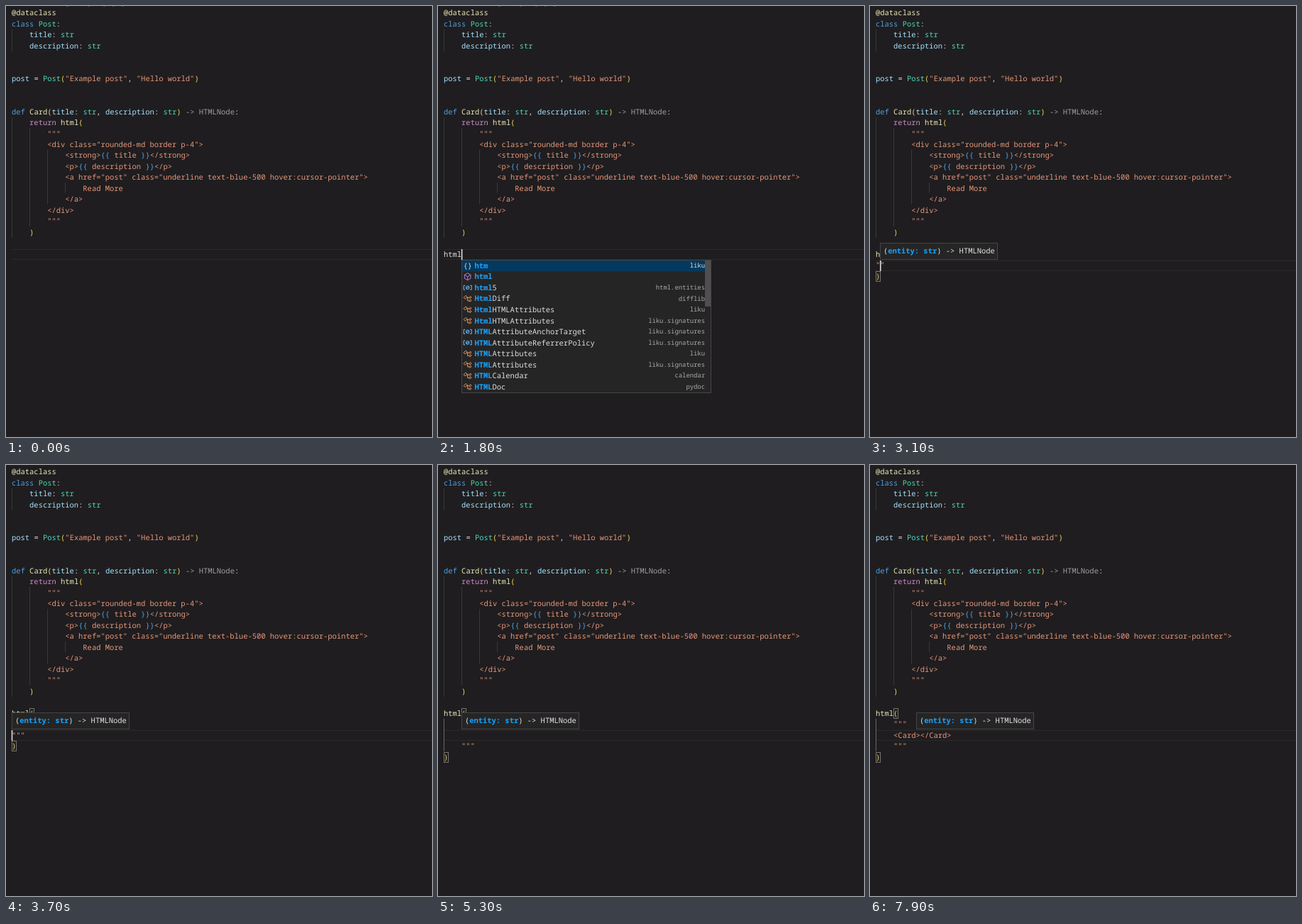
Write an HTML page with a canvas that moves like this. It is 600 by 608 pixels and loops after 8000 ms.

```html
<!DOCTYPE html>
<html lang="en">
<head>
<meta charset="utf-8">
<title>Editor typing</title>
<style>
  html, body { margin: 0; width: 100%; height: 100%; overflow: hidden; background: #1f1d1f; }
  canvas { display: block; width: 600px; height: 608px; }
</style>
</head>
<body>
<canvas id="stage" width="600" height="608"></canvas>
<script>
const ctx = document.getElementById('stage').getContext('2d');
const LOOP = 8000, LEFT = 8, CHAR = 6.28, TOP = 1.75, LINE = 15.48;
const BLINK = 600, FIRST = 22;
const FAMILY = '"Noto Sans Mono", "DejaVu Sans Mono", monospace';
const SIZE = CHAR / 0.6;

const COLORS = {
  w: '#e2e2e2', f: '#e8e8b6', k: '#4f9fe2', t: '#4fd6bb', v: '#a4e2ff',
  s: '#e6977a', g: '#f6da58', r: '#cc8cc6', h: '#9e9e9e', b: '#18a3ff', e: '#cb5f4c'
};

// Segments are split by "|"; the first letter of each picks its color.
const CODE = [
  'f@dataclass',
  'kclass |tPost|w:',
  'v    title|w: |tstr',
  'v    description|w: |tstr',
  '', '',
  'vpost |w= |tPost|g(|s"Example post"|w, |s"Hello world"|g)',
  '', '',
  'kdef |fCard|g(|vtitle|w: |tstr|w, |vdescription|w: |tstr|g)|h -> HTMLNode|w:',
  'r    return |fhtml|g(',
  's        """',
  's        <div class="rounded-md border p-4">',
  's            <strong>|k{{|s title |k}}|s</strong>',
  's            <p>|k{{|s description |k}}|s</p>',
  's            <a href="post" class="underline text-blue-500 hover:cursor-pointer">',
  's                Read More',
  's            </a>',
  's        </div>',
  's        """',
  'g    )'
];

// [column, first line, last line]
const GUIDES = [[0, 2, 3], [0, 10, 20], [4, 11, 19], [8, 13, 17], [12, 16, 16]];

const OPEN = 'fhtml|g(', CLOSE = 'g)', QUOTES = 's"""', INDENTED = 's    """';
const block = (...body) => [OPEN, ...body, CLOSE];
const tag = text => block(INDENTED, 's    ' + text, INDENTED);

// [time, typed lines, cursor line, cursor column]
const EDITS = [
  [-600, [''], 0, 0],
  [1000, ['wh'], 0, 1],
  [1100, ['wht'], 0, 2],
  [1200, ['whtm'], 0, 3],
  [1800, ['whtml'], 0, 4],
  [1900, ['fhtml|g()'], 0, 5],
  [2800, block(''), 1, 0],
  [3000, block('s""'), 1, 1],
  [3200, block('s""'), 1, 2],
  [3400, block('s""""""'), 1, 3],
  [3700, block(QUOTES, QUOTES), 2, 0],
  [4000, block(QUOTES, INDENTED), 2, 4],
  [4200, block(QUOTES, INDENTED), 1, 0],
  [4300, block(INDENTED, INDENTED), 1, 4],
  [4500, block(INDENTED, INDENTED), 1, 7],
  [4600, tag(''), 2, 4],
  [6000, tag('<'), 2, 5],
  [6200, tag('<C'), 2, 6],
  [6300, tag('<Ca'), 2, 7],
  [6400, tag('<Car'), 2, 8],
  [6500, tag('<Card'), 2, 9],
  [6800, tag('<Card></Card>'), 2, 9]
];

// [icon, label, module]
const SUGGESTIONS = [
  ['snippet', 'htm', 'liku'], ['cube', 'html', ''],
  ['variable', 'html5', 'html.entities'], ['class', 'HtmlDiff', 'difflib'],
  ['class', 'HtmlHTMLAttributes', 'liku'], ['class', 'HtmlHTMLAttributes', 'liku.signatures'],
  ['variable', 'HTMLAttributeAnchorTarget', 'liku.signatures'],
  ['variable', 'HTMLAttributeReferrerPolicy', 'liku.signatures'],
  ['class', 'HTMLAttributes', 'liku'], ['class', 'HTMLAttributes', 'liku.signatures'],
  ['class', 'HTMLCalendar', 'calendar'], ['class', 'HTMLDoc', 'pydoc']
];

const colX = col => LEFT + col * CHAR;
const lineY = line => TOP + line * LINE;

function fill(x, y, w, h, color) {
  ctx.fillStyle = color;
  ctx.fillRect(x, y, w, h);
}

function frame(x, y, w, h, color) {
  ctx.strokeStyle = color;
  ctx.lineWidth = 1;
  ctx.strokeRect(Math.round(x) + 0.5, Math.round(y) + 0.5, Math.round(w), Math.round(h));
}

function path(color, width, points, closed) {
  ctx.strokeStyle = color;
  ctx.lineWidth = width;
  ctx.beginPath();
  points.forEach(([x, y]) => ctx.lineTo(x, y));
  if (closed) ctx.closePath();
  ctx.stroke();
}

function disc(x, y, r, color) {
  ctx.fillStyle = color;
  ctx.beginPath();
  ctx.arc(x, y, r, 0, 7);
  ctx.fill();
}

function arc(x, y, r, end, width, color) {
  ctx.strokeStyle = color;
  ctx.lineWidth = width;
  ctx.beginPath();
  ctx.arc(x, y, r, 0, end);
  ctx.stroke();
}

function write(text, x, y, color, { size = SIZE, weight = 500, align = 'left' } = {}) {
  ctx.font = `${weight} ${size}px ${FAMILY}`;
  ctx.textAlign = align;
  ctx.fillStyle = color;
  ctx.fillText(text, x, y);
}

function writeCode(markup, line) {
  let col = 0;
  if (!markup) return;
  for (const part of markup.split('|')) {
    const text = part.slice(1);
    write(text, colX(col), lineY(line) + 11.5, COLORS[part[0]]);
    col += text.length;
  }
}

function guide(col, from, to, color) {
  fill(Math.round(colX(col)), Math.round(lineY(from)), 1, Math.round((to - from + 1) * LINE), color);
}

function bracketBox(line, col) {
  frame(colX(col), lineY(line) + 0.5, CHAR, LINE - 1.5, '#747474');
}

function squiggle(chars) {
  const points = [];
  for (let x = 0; x <= chars * CHAR; x += 0.5) {
    points.push([LEFT + x, 356.8 + Math.sin(x * 1.55)]);
  }
  path('#f14c4c', 1, points);
}

function errorLine(message, chars) {
  fill(LEFT, lineY(FIRST), 600 - LEFT, LINE, '#3a2322');
  write(message, colX(chars + 4), lineY(FIRST) + 11.5, COLORS.e, { weight: 700 });
}

function bulb() {
  disc(15, 331.5, 4, '#f5c52c');
  fill(13, 334, 4, 2, '#f5c52c');
  fill(13, 337, 4, 1.3, '#d9b64a');
}

const ICONS = {
  snippet(x, y) {
    write('{', x - 6, y + 3.8, '#d4d4d4');
    write('}', x, y + 3.8, '#d4d4d4');
  },
  cube(x, y) {
    const corner = i => [x + 5 * Math.sin(i * Math.PI / 3), y - 5 * Math.cos(i * Math.PI / 3)];
    path('#b180d7', 1, [0, 1, 2, 3, 4, 5].map(corner), true);
    path('#b180d7', 1, [corner(5), [x, y], corner(1)]);
    path('#b180d7', 1, [[x, y], corner(3)]);
  },
  variable(x, y) {
    for (const side of [-1, 1]) {
      path('#75beff', 1, [[x + side * 3.5, y - 3], [x + side * 5.5, y - 3],
        [x + side * 5.5, y + 3], [x + side * 3.5, y + 3]]);
    }
    arc(x, y, 2.3, 7, 1, '#75beff');
    path('#75beff', 1, [[x - 2, y + 1], [x + 2, y - 1]]);
  },
  class(x, y) {
    const color = '#ec9a62';
    path(color, 1, [[x - 5.5, y - 1.5], [x - 2.5, y - 4.5], [x - 0.5, y - 2.5], [x - 3.5, y + 0.5]], true);
    path(color, 1, [[x - 1.5, y - 1.5], [x + 2, y - 1.5]]);
    path(color, 1, [[x, y - 1.5], [x, y + 3], [x + 2, y + 3]]);
    for (const dy of [-1.5, 3]) {
      path(color, 1, [[x + 2, y + dy], [x + 3.9, y + dy - 1.7],
        [x + 5.4, y + dy - 0.4], [x + 3.5, y + dy + 1.3]], true);
    }
  },
  wrench(x, y) {
    path('#e8e8e8', 2.2, [[x - 4, y + 4], [x + 1, y - 1]]);
    arc(x + 2, y - 2, 2.6, Math.PI * 1.5, 1.6, '#e8e8e8');
  }
};

function popup(line, col, items, matched) {
  const x = Math.round(colX(col)), y = Math.round(lineY(line + 1));
  const row = 15.54, height = items.length * row;
  fill(x, y, 351, height + 2, '#252526');
  fill(x, y + 1, 351, row, '#04395e');
  items.forEach(([icon, label, module], i) => {
    const mid = y + 8.2 + i * row, labelX = x + 18.4;
    ICONS[icon](x + 8.7, mid);
    write(label.slice(0, matched), labelX, mid + 3.6, COLORS.b, { weight: 700 });
    write(label.slice(matched), labelX + matched * CHAR, mid + 3.6, '#dedede');
    write(module, x + 343, mid + 2.8, i ? '#aaaaaa' : '#e0e0e0', { size: 8.88, align: 'right' });
  });
  if (items.length > 1) fill(x + 343, y + 1, 8, 65, '#4f4f51');
  frame(x - 0.4, y, 351, height + 1, '#454545');
}

function signature(line, col) {
  const x = Math.round(colX(col)), y = Math.round(lineY(line)) - 24;
  const base = y + 15.3, at = n => x + 4.9 + n * CHAR;
  fill(x, y, 166, 24, '#252526');
  frame(x, y, 165, 23, '#454545');
  write('(', at(0), base, COLORS.w);
  write('entity: str', at(1), base, COLORS.b, { weight: 700 });
  write(') -> HTMLNode', at(12), base, COLORS.w);
}

function draw(t) {
  const [since, lines, row, col] = EDITS.filter(edit => edit[0] <= t).pop();
  const cursorLine = FIRST + row;
  const called = t >= 1900, multiline = t >= 2800;

  fill(0, 0, 600, 608, '#1f1d1f');
  // Descenders of the line scrolled out above
  if (t < 1900) [85, 115, 137, 150, 163].forEach(x => fill(x, 0, 3, 1, '#4a4a4a'));

  const top = Math.round(lineY(cursorLine)) + 1;
  fill(LEFT, top, 600 - LEFT, 1, '#2b2a2b');
  fill(LEFT, top + 14, 600 - LEFT, 1, '#2b2a2b');

  if (t >= 1200 && t < 1800) errorLine('Undefined name `ht`', 3);
  if (t >= 2200 && !multiline) errorLine('Argument missing for parameter "entity"', 6);

  GUIDES.forEach(([c, from, to]) => guide(c, from, to, '#393839'));
  if (t >= 4300) guide(0, FIRST + 1, FIRST + lines.length - 2, '#686868');

  CODE.forEach(writeCode);
  lines.forEach((markup, i) => writeCode(markup, FIRST + i));

  if (t >= 1200 && t < 1800) squiggle(3);
  if (t >= 2200 && !multiline) squiggle(6);
  if (called) {
    bracketBox(FIRST, 4);
    bracketBox(FIRST + lines.length - 1, multiline ? 0 : 5);
  }

  if (Math.floor((t - since) / BLINK) % 2 === 0 && !(called && !multiline)) {
    fill(colX(col) - 0.3, top, 1.6, 15, '#dcdcdc');
  }
  if (t >= 2300 && !multiline) bulb();
  if (called) signature(cursorLine, col);
  if (t >= 1100 && t < 1900) popup(FIRST, col, SUGGESTIONS, col);
  if (t >= 6500 && t < 6800) popup(cursorLine, col, [['wrench', 'Card', '']], 4);
}

ctx.textRendering = 'geometricPrecision';
const start = performance.now();
function tick() {
  draw((performance.now() - start) % LOOP);
  requestAnimationFrame(tick);
}
tick();
</script>
</body>
</html>
```
